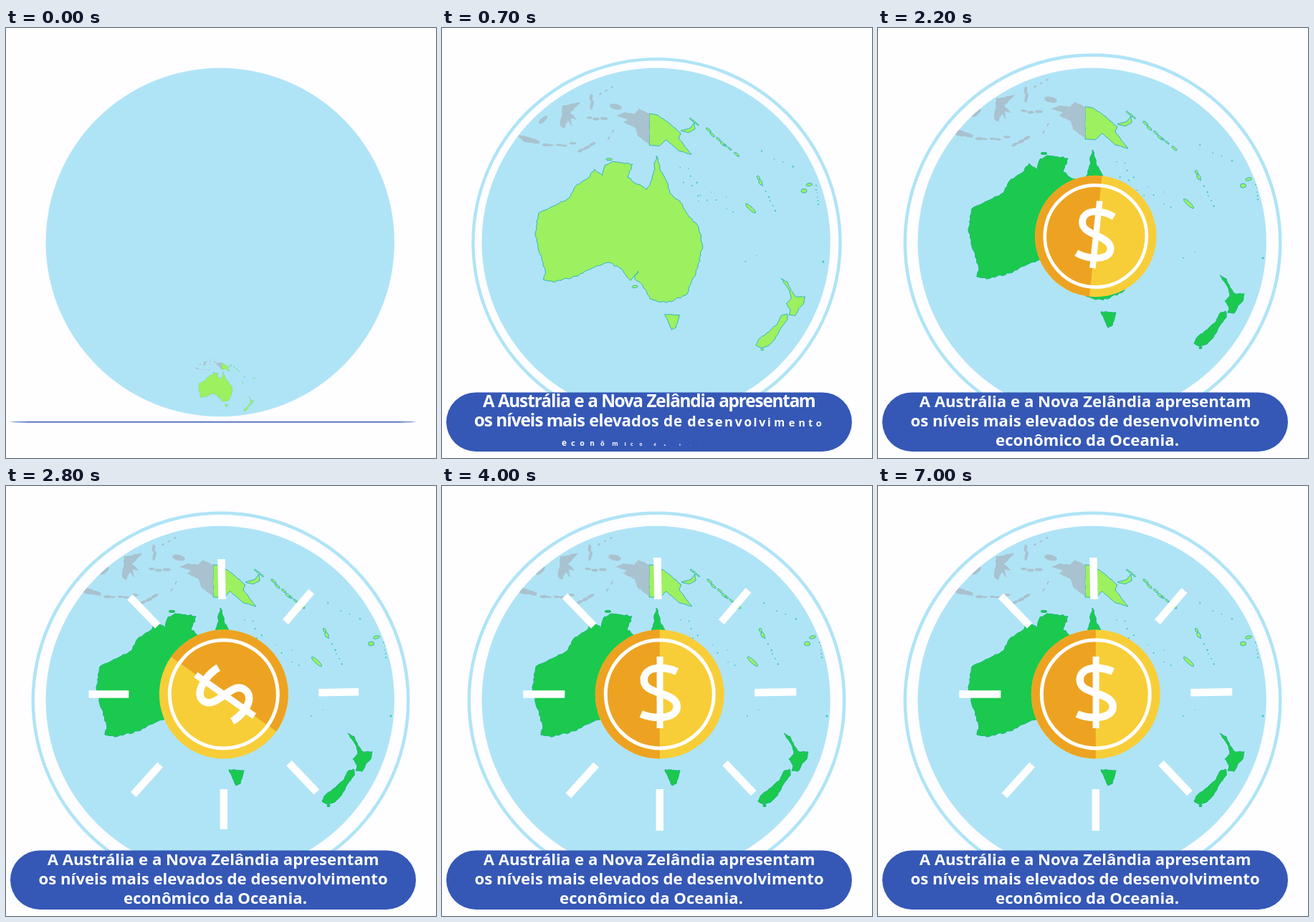
An HTML page with a canvas that plays this animation: 600x600 px, repeating every 8 s.

```html
<!DOCTYPE html>
<html lang="pt">
<head>
<meta charset="utf-8">
<style>
html, body { margin: 0; width: 100%; height: 100%; overflow: hidden; background: #fefdff; }
canvas { display: block; }
</style>
</head>
<body>
<canvas id="stage" width="600" height="600"></canvas>
<script>
const ctx = document.getElementById('stage').getContext('2d');
const LOOP = 8000, STEP = 100;
const SEA = '#afe4f6', LIME = '#9df05f', GREEN = '#1bc94f', GREY = '#a9c2cf', PAPER = '#fefdff';
const SHORE = '#2fb4bd';

let seed = 11;
const random = () => (seed = (seed * 16807) % 2147483647) / 2147483647;
const spread = range => (random() - 0.5) * range;
const clamp = v => Math.max(0, Math.min(1, v));
const progress = (t, start, length) => clamp((t - start) / length);
const easeOut = (p, power = 3) => 1 - (1 - p) ** power;
const easeSine = p => (1 - Math.cos(Math.PI * p)) / 2;
const mix = (a, b, p) => a + (b - a) * p;

// Closed outline through key points with a ragged, seeded edge.
function coast(points, rough) {
  const path = new Path2D();
  const list = points.split(' ').map(p => p.split(',').map(Number));
  list.forEach(([x, y], i) => {
    const [nx, ny] = list[(i + 1) % list.length];
    const length = Math.hypot(nx - x, ny - y);
    const parts = Math.ceil(length / 4);
    for (let k = 0; k < parts; k++) {
      const off = k ? spread(rough) / length : 0;
      path.lineTo(mix(x, nx, k / parts) - (ny - y) * off, mix(y, ny, k / parts) + (nx - x) * off);
    }
  });
  path.closePath();
  return path;
}

// Row of small islands between two points, each turned along the row.
function chain(x1, y1, x2, y2, { count = 1, long = 2, wide = long, stray = 0 }) {
  const path = new Path2D();
  const angle = Math.atan2(y2 - y1, x2 - x1);
  for (let i = 0; i < count; i++) {
    const p = (i + 0.5) / count;
    const x = mix(x1, x2, p) + spread(stray), y = mix(y1, y2, p) + spread(stray);
    const size = count > 1 ? 0.75 + random() / 2 : 1;
    path.moveTo(x + Math.cos(angle) * long * size, y + Math.sin(angle) * long * size);
    path.ellipse(x, y, long * size, wide * size, angle, 0, 7);
  }
  return path;
}

const mainland = [
  coast('299,170 304,188 314,207 318,223 334,237 345,256 359,271 365,298 358,330 343,367 ' +
    '320,378 304,379 290,374 277,352 268,345 273,334 262,348 249,331 230,322 200,333 ' +
    '188,341 152,350 138,347 141,338 126,281 131,252 160,238 175,230 183,214 201,202 ' +
    '211,189 222,198 226,183 236,178 265,182 258,201 285,218 293,203', 2.4),
  coast('311,396 332,397 327,415 321,418', 1),
  coast('477,345 486,350 491,362 498,371 511,371 509,381 502,388 497,398 488,397 490,390 ' +
    '484,381 491,374 489,363', 1.2),
  coast('485,395 486,404 474,420 466,434 459,441 449,444 441,440 444,433 462,418 472,409 477,398', 1.4),
  chain(264, 357, 273, 356, { long: 4, wide: 1.8 }),
  chain(227, 175, 236, 175, { long: 4.5, wide: 1.5 }),
  chain(448, 446, 452, 446, { long: 2, wide: 1.5 })
];
const papua = coast('289,110 301,112 318,124 334,138 331,145 349,168 331,163 313,147 303,156 289,155', 1);
const islands = [
  coast('334,134 348,130 353,123 354,132 344,137', 0.8),
  chain(346, 116, 360, 127, { count: 3, long: 2.5, wide: 1 }),
  chain(370, 132, 415, 170, { count: 7, long: 4, wide: 1.4, stray: 4 }),
  chain(426, 238, 441, 252, { long: 9.5, wide: 2.4 }),
  chain(443, 198, 449, 211, { count: 2, long: 3.5, wide: 2 }),
  chain(505, 220, 514, 220, { long: 4, wide: 3 }),
  chain(512, 212, 522, 210, { long: 4.5, wide: 2 })
];
const specks = [
  chain(326, 197, 405, 240, { count: 15, long: 0.9, stray: 28 }),
  chain(450, 210, 472, 252, { count: 6, long: 1, stray: 4 }),
  chain(527, 210, 530, 241, { count: 6, long: 0.9, stray: 2 }),
  chain(440, 160, 505, 192, { count: 4, long: 1, stray: 6 }),
  chain(418, 325, 450, 308, { count: 2, long: 0.8 }),
  chain(536, 320, 538, 322, { long: 1.5 })
];
const westPapua = coast('289,110 274,103 268,110 253,108 242,113 258,118 252,122 269,130 272,141 289,154', 1);
const archipelago = [
  coast('98,139 117,143 133,149 132,153 110,150', 1),
  coast('165,98 191,94 176,109 186,118 177,116 180,128 173,120 168,131 162,127', 2),
  chain(136, 153, 184, 154, { count: 5, long: 4.5, wide: 1.7, stray: 4 }),
  chain(187, 164, 211, 152, { count: 3, long: 5, wide: 2, stray: 2 }),
  chain(208, 85, 206, 103, { count: 3, long: 4, wide: 1.8, stray: 4 }),
  chain(232, 98, 250, 102, { long: 9, wide: 4 }),
  chain(198, 116, 229, 117, { count: 3, long: 4.5, wide: 1.8, stray: 2 }),
  chain(145, 112, 130, 125, { long: 8, wide: 3 }),
  chain(228, 150, 240, 130, { count: 2, long: 2.5, wide: 1 }),
  chain(215, 84, 240, 70, { count: 3, long: 2, wide: 1.2 })
];

function drawLand(paths, fill, edge) {
  ctx.fillStyle = fill;
  ctx.strokeStyle = edge;
  ctx.lineWidth = 1;
  for (const path of paths) {
    ctx.fill(path);
    if (edge) ctx.stroke(path);
  }
}

function disc(x, y, r, fill) {
  ctx.beginPath();
  ctx.arc(x, y, r, 0, 7);
  ctx.fillStyle = fill;
  ctx.fill();
}

function drawGlobe(t) {
  const zoom = mix(0.2, 1, easeOut(progress(t, 0, 1000)));
  disc(299.5, 299.5, 264 * zoom, SEA);
  disc(299.5, 299.5, 259.5 * zoom, PAPER);
  disc(298.7, 299, 243.2, SEA);

  ctx.save();
  ctx.clip();
  ctx.translate(304 * (1 - zoom), 557 * (1 - zoom));
  ctx.scale(zoom, zoom);
  drawLand([papua, ...islands], LIME, SHORE);
  drawLand([westPapua, ...archipelago], GREY);
  drawLand(specks, '#3cc7b4');
  drawLand(mainland, LIME, SHORE);
  ctx.globalAlpha = progress(t, 1500, 400);
  drawLand(mainland, GREEN, '#22bd6c');
  ctx.restore();
}

const rayAngles = [-91, -49.5, -1, 46.5, 90, 132, 180, 226];

function drawRays(t) {
  const grow = easeOut(progress(t, 2400, 600));
  if (!grow) return;
  for (const degrees of rayAngles) {
    ctx.save();
    ctx.translate(303.8, 290.5);
    ctx.rotate(degrees * Math.PI / 180);
    ctx.fillStyle = '#fff';
    ctx.fillRect(132.5, -5.25, 58 * grow, 10.5);
    ctx.restore();
  }
}

const dollar = new Path2D('M24-31.5Q13-36.5 1-36.5C-13-36.5-22-30.5-22-20C-22-9.5-13-6 0-1.5' +
  'C16 3.5 24 8.5 24 17.5C24 27.5 13 32.5-1 32.5Q-15 32.5-26 27.5');

function drawCoin(t) {
  const size = easeOut(progress(t, 1590, 1000));
  if (!size) return;
  ctx.save();
  ctx.translate(303.8, 290.5);
  ctx.scale(size, size);
  ctx.rotate(2 * Math.PI * easeSine(progress(t, 2045, 1880)));
  disc(0, 0, 90, '#f7ce38');
  ctx.beginPath();
  ctx.arc(0, 0, 90, Math.PI / 2, -Math.PI / 2);
  ctx.fillStyle = '#eda321';
  ctx.fill();
  ctx.strokeStyle = '#fff';
  ctx.lineWidth = 5;
  ctx.beginPath();
  ctx.arc(0, 0, 75.5, 0, 7);
  ctx.stroke();
  ctx.lineWidth = 10.5;
  ctx.stroke(dollar);
  ctx.fillStyle = '#fff';
  ctx.fillRect(-4.2, -52.5, 9, 100);
  ctx.restore();
}

const lines = [
  'A Austrália e a Nova Zelândia apresentam ',
  'os níveis mais elevados de desenvolvimento ',
  'econômico da Oceania.'
];

// Letters pop past full size and settle.
const letterScale = age =>
  1.1 * easeOut(progress(age, 0, 340), 2) - 0.1 * progress(age, 580, 90);

function drawCaption(t) {
  const open = mix(0.018, 1, easeOut(progress(t, 0, 600)));
  ctx.save();
  ctx.translate(289, 549.7);
  ctx.scale(1, open);
  ctx.beginPath();
  ctx.roundRect(-283, -41.3, 566, 82.6, 41.3);
  ctx.fillStyle = '#3558b6';
  ctx.fill();
  ctx.restore();

  ctx.font = 'bold 22.2px "Open Sans", sans-serif';
  ctx.fillStyle = '#fff';
  ctx.textAlign = 'center';
  let index = 0;
  lines.forEach((line, row) => {
    const left = 292 - ctx.measureText(line).width / 2;
    [...line].forEach((letter, i) => {
      const scale = letterScale(t - 100 - 6 * index++);
      if (!scale) return;
      const end = ctx.measureText(line.slice(0, i + 1)).width;
      ctx.save();
      ctx.translate(left + end - ctx.measureText(letter).width / 2, 528.8 + 27 * row);
      ctx.scale(scale, scale);
      ctx.fillText(letter, 0, 0);
      ctx.restore();
    });
  });
}

function draw(t) {
  ctx.fillStyle = PAPER;
  ctx.fillRect(0, 0, 600, 600);
  drawGlobe(t);
  drawRays(t);
  drawCoin(t);
  drawCaption(t);
}

const start = performance.now();
function tick() {
  const t = (performance.now() - start) % LOOP;
  draw(Math.floor(t / STEP) * STEP);
  requestAnimationFrame(tick);
}
tick();
</script>
</body>
</html>
```
